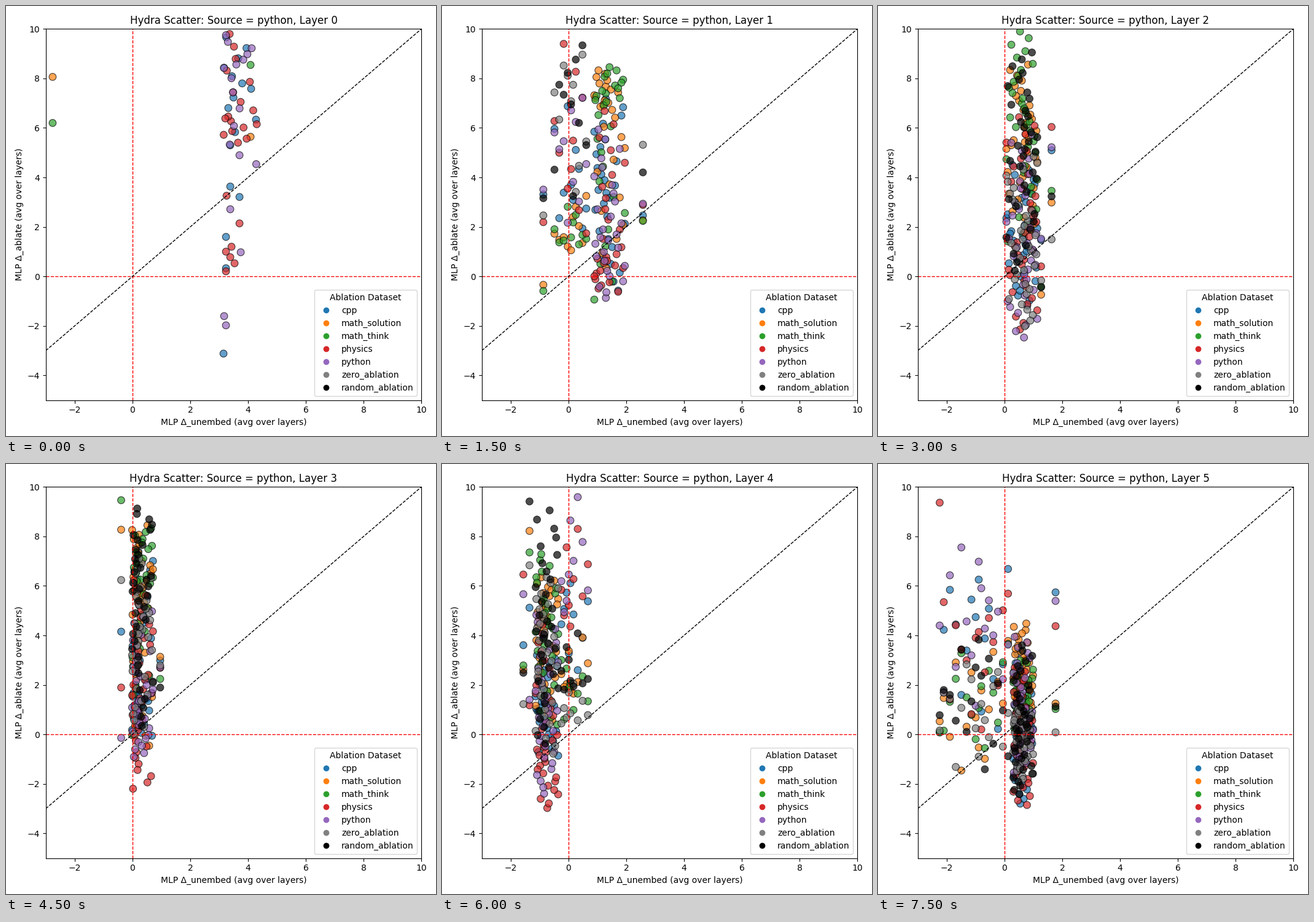
Animation, 700 px wide and 700 px high, one loop 8 s. Source, as a matplotlib script:

```python
import numpy as np
import matplotlib.pyplot as plt
from matplotlib.animation import FuncAnimation
from matplotlib.colors import to_rgba
from matplotlib.lines import Line2D

NAMES = ["cpp", "math_solution", "math_think", "physics", "python",
         "zero_ablation", "random_ablation"]
COLORS = ["tab:blue", "tab:orange", "tab:green", "tab:red", "tab:purple",
          "gray", "black"]
CPP, SOLUTION, THINK, PHYSICS, PYTHON, ZERO, RANDOM = range(len(NAMES))
FILLS = np.array([to_rgba(c, 0.7) for c in COLORS])
rng = np.random.default_rng(7)


def spread(n, low, mid, high):
    """n shuffled values between low and high with the median at mid."""
    q = (np.arange(n) + 0.5) / n
    s = 2 * q - 1
    reach = np.where(s < 0, mid - low, high - mid)
    return rng.permutation(mid + reach * np.sign(s) * np.abs(s) ** 1.25)


def cloud(n, x, **ranges):
    """Rows sharing one x, with a sampled height for each dataset."""
    xs = spread(n, *x)
    return [(k, px, py) for name, span in ranges.items()
            for k in [NAMES.index(name)]
            for px, py in zip(xs, spread(n, *span))]


def column(x, *ys):
    return [(k, x, y) for k, y in enumerate(ys)]


def marks(k, *points):
    return [(k, x, y) for x, y in points]


def layer(*parts):
    """Sort by dataset and turn stage pixels into axis units."""
    pts = np.array(sorted((p for part in parts for p in part), key=lambda p: p[0]))
    xy = np.column_stack([(pts[:, 1] - 205.9) / 47, (440.3 - pts[:, 2]) / 40.29])
    return xy, FILLS[pts[:, 0].astype(int)]


band = (353, 371, 411)
LAYERS = [
    layer(
        cloud(12, band, cpp=(42, 130, 238)),
        cloud(17, band, physics=(35, 180, 226)),
        cloud(13, band, python=(42, 101, 274)),
        marks(CPP, (365, 294), (380, 311), (358, 376), (358, 427), (354, 566)),
        marks(SOLUTION, (76, 115.5), (398, 213)),
        marks(THINK, (76, 190.5), (398, 96)),
        marks(PHYSICS, (359, 309), (380, 354), (367, 392), (358, 400),
              (365, 409), (372, 419), (358, 432)),
        marks(PYTHON, (380, 243), (365, 331), (382, 401), (355, 505), (358, 520))),
    layer(
        column(165, 307, 454, 464, 352, 299, 341, 313),
        column(327, 341, 349, 350, 324, 322, 226, 271),
        cloud(10, (179, 212, 238), cpp=(144, 300, 371), math_solution=(300, 375, 401),
              math_think=(320, 376, 390), physics=(38, 230, 390),
              python=(139, 225, 371), zero_ablation=(70, 145, 325),
              random_ablation=(52, 150, 332)),
        cloud(28, (247, 267, 299), cpp=(144, 302, 471), math_solution=(102, 165, 439),
              math_think=(97, 157, 493), physics=(160, 408, 468),
              python=(193, 375, 480))),
    layer(
        column(282.5, 235, 320, 301, 197, 230, 380, 310),
        column(265.5, 381, 470, 457, 424, 379, 447, 458),
        cloud(36, (208, 238, 260), cpp=(255, 372, 492), math_solution=(91, 220, 370),
              math_think=(36, 195, 390), physics=(174, 378, 532),
              python=(203, 395, 545), zero_ablation=(240, 393, 526),
              random_ablation=(70, 235, 438))),
    layer(
        column(187.5, 273, 107, 59, 364, 446, 189),
        column(251, 320, 314, 350, 332, 331, 328, 364),
        cloud(38, (205, 216, 240), cpp=(135, 370, 445), math_solution=(96, 215, 467),
              math_think=(102, 192, 450), physics=(183, 375, 534),
              python=(235, 385, 480), zero_ablation=(150, 275, 445),
              random_ablation=(68, 205, 434))),
    layer(
        column(132.5, 295, 335, 328, 180, 212, 391, 340),
        column(142.5, 234, 109, 144, 393, 384, 165, 61),
        cloud(9, (192, 209, 242), cpp=(186, 245, 350), math_solution=(271, 355, 377),
              math_think=(312, 365, 424), physics=(90, 205, 274),
              python=(34, 180, 251), zero_ablation=(350, 406, 425),
              random_ablation=(264, 350, 370)),
        cloud(34, (152, 167, 190), cpp=(308, 395, 478), math_solution=(182, 255, 424),
              math_think=(142, 275, 430), physics=(254, 460, 564),
              python=(240, 400, 542), zero_ablation=(180, 305, 478),
              random_ablation=(68, 275, 462))),
    layer(
        column(100.5, 437, 419, 437, 63, 263, 434, 409),
        column(289, 209, 390, 399, 264, 223, 437, 395),
        cloud(15, (102, 164, 216), cpp=(162, 270, 446), math_solution=(279, 390, 509),
              math_think=(285, 380, 470), physics=(204, 290, 445),
              python=(124, 268, 405), zero_ablation=(320, 397, 502),
              random_ablation=(278, 376, 508)),
        cloud(40, (220, 232, 253), cpp=(305, 430, 557), math_solution=(257, 345, 400),
              math_think=(318, 380, 440), physics=(328, 440, 559),
              python=(277, 420, 505), zero_ablation=(395, 445, 515),
              random_ablation=(291, 430, 541))),
]

fig, ax = plt.subplots(figsize=(7, 7), dpi=100)
dots = ax.scatter([], [], s=70, edgecolors=[(0, 0, 0, 0.7)], linewidths=0.8)
ax.axhline(0, color="red", linestyle="--", linewidth=1)
ax.axvline(0, color="red", linestyle="--", linewidth=1)
ax.plot([-3, 10], [-3, 10], "k--", linewidth=1)
ax.set_xlim(-3, 10)
ax.set_ylim(-5, 10)
ax.set_xlabel("MLP Δ_unembed (avg over layers)")
ax.set_ylabel("MLP Δ_ablate (avg over layers)")
title = ax.set_title("Hydra Scatter: Source = python, Layer 0")
handles = [Line2D([0], [0], marker="o", color="w", markerfacecolor=c,
                  markersize=8, label=n) for n, c in zip(NAMES, COLORS)]
ax.legend(handles=handles, title="Ablation Dataset", loc="lower right")
fig.tight_layout()


def update(i):
    k = i // 3
    xy, fills = LAYERS[k]
    dots.set_offsets(xy)
    dots.set_facecolors(fills)
    title.set_text(f"Hydra Scatter: Source = python, Layer {k}")
    return dots, title


anim = FuncAnimation(fig, update, frames=16, interval=500, repeat=True,
                     repeat_delay=0, blit=False)
plt.show()
```
